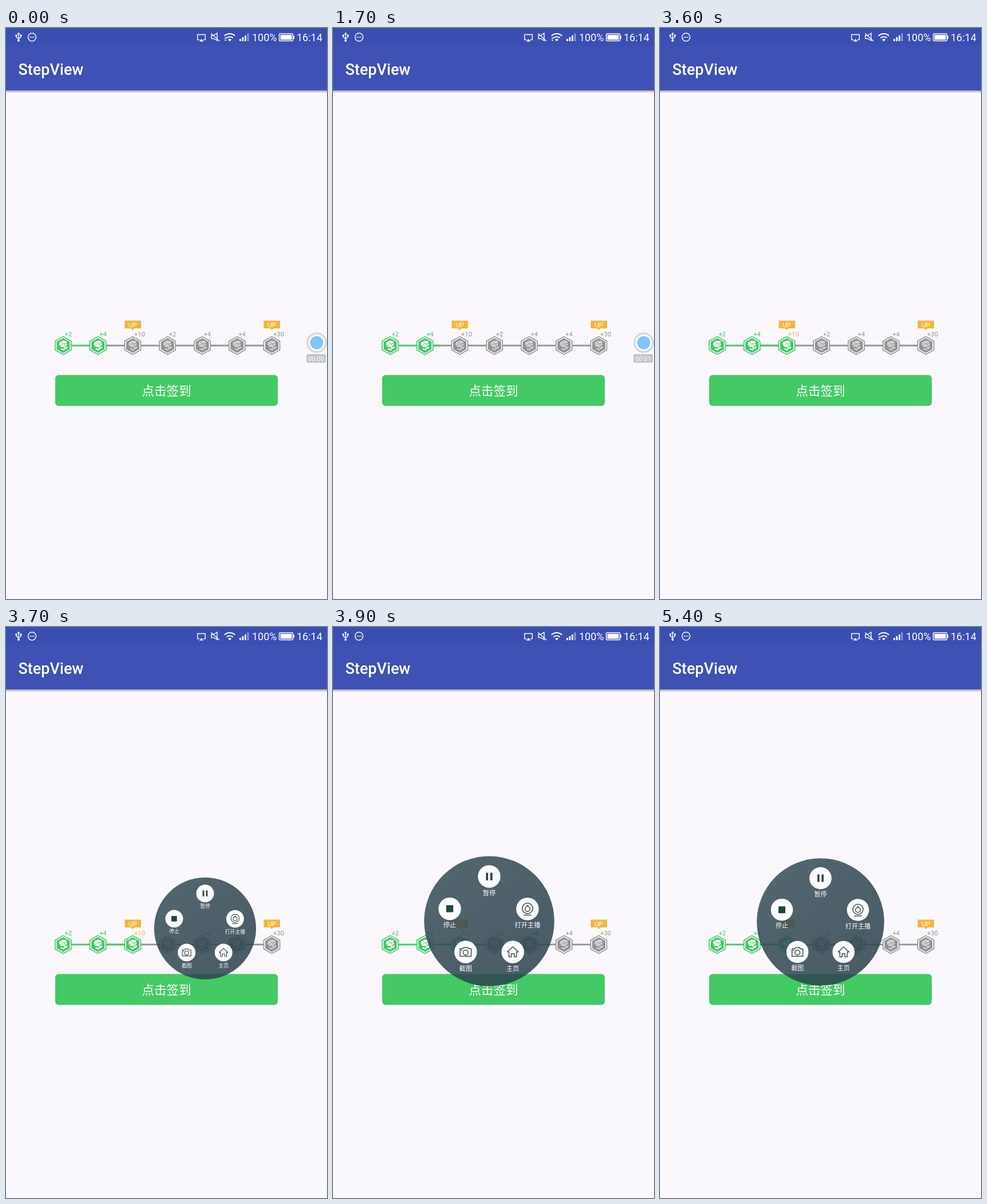
Write an HTML page that moves like this. It is 561 by 998 pixels and loops after 6000 ms.

```html
<!DOCTYPE html>
<html lang="zh-CN">
<head>
<meta charset="utf-8">
<title>StepView</title>
<style>
  html, body { margin: 0; width: 100%; height: 100%; overflow: hidden; background: #faf8fc; }
  svg { display: block; width: 561px; height: 998px; }
  text { font-family: Roboto, "Noto Sans CJK SC", "Noto Sans CJK", sans-serif; fill: #fff; }
  .cjk { font-family: "Noto Sans CJK SC", "Noto Sans CJK", sans-serif; }
  .mid { text-anchor: middle; }
  .line { fill: none; stroke: #fff; stroke-width: 1.4; }
  .dark { fill: none; stroke: #34474f; stroke-width: 1.4; stroke-linejoin: round; stroke-linecap: round; }
  .step { color: #929294; --rose: #d2d2d4; }
  .step.done { color: #42c965; --rose: #fff; }
</style>
</head>
<body>
<svg viewBox="0 0 561 998">
  <defs>
    <linearGradient id="shade" x2="0" y2="1">
      <stop stop-color="#000" stop-opacity=".34"/>
      <stop offset="1" stop-color="#000" stop-opacity="0"/>
    </linearGradient>
    <linearGradient id="glass" x1=".1" y1=".1" x2=".8" y2=".9">
      <stop stop-color="#354b54"/>
      <stop offset="1" stop-color="#2a414d"/>
    </linearGradient>
    <g id="hexagon">
      <path d="M0-15.6L14-7.8V7.8L0 15.6L-14 7.8V-7.8Z" fill="#fff" stroke="currentColor" stroke-width="1.6"/>
      <path d="M0-13L11.5-6.5V6.5L0 13L-11.5 6.5V-6.5Z" fill="currentColor"/>
    </g>
    <g id="rose">
      <path d="M-7-3Q-7-7-3-7Q-1-10 2-8Q7-9 6-4Q8-1 4 1Q2 4-1 2Q-5 4-6 0Q-8-1-7-3Z"/>
      <path d="M1 2Q4 5 0 9M2 5Q5 6 7 3" fill="none" stroke="var(--rose)" stroke-width="1.5"/>
      <path d="M3 5Q4 1 8 2Q7 6 3 5ZM1 6Q-3 4-5 6Q-2 9 1 7Z"/>
      <path d="M-3-6Q-1-2 3-3L6-4M-1-3Q-3 0-6 0M2-3Q1 0 4 1" fill="none" stroke="currentColor" stroke-width=".9"/>
    </g>
  </defs>

  <rect width="561" height="998" fill="#faf8fc"/>
  <rect y="109" width="561" height="5" fill="url(#shade)"/>
  <rect width="561" height="109" fill="#3f51b5"/>
  <rect width="561" height="31" fill="#3b4eb2"/>

  <g id="status">
    <path class="line" d="M22 9V22M18 13V16L22 19L26 16V13"/>
    <path d="M19.500 11L22 7.500L24.500 11ZM16.500 11.500h3v3h-3ZM24.500 11.500h3v3h-3Z" fill="#fff"/>
    <circle cx="22" cy="22" r="2" fill="#fff"/>
    <circle class="line" cx="45.500" cy="16" r="7"/>
    <path d="M41.500 15.300h1.800v1.800h-1.800ZM44.600 15.300h1.800v1.800h-1.800ZM47.700 15.300h1.800v1.800h-1.800Z" fill="#fff"/>
    <path class="line" d="M338 20.500H334.700V11.500H348.300V20.500H345"/>
    <path d="M337.500 23.500L341.500 19L345.500 23.500Z" fill="#fff"/>
    <path class="line" d="M359 13H363L369 9V22L363 18.500H359ZM358.500 9.500L373 23"/>
    <g class="line" stroke-width="2">
      <path d="M381.800 13.800A13 13 0 0 1 400.200 13.800" style="stroke-width:2"/>
      <path d="M385.300 17.500A8.100 8.100 0 0 1 396.700 17.500" style="stroke-width:2"/>
    </g>
    <path d="M388 20.300A4.200 4.200 0 0 1 394 20.300L391 23.500Z" fill="#fff"/>
    <path id="traffic" d="M381.500 18.500h4l-2 -2.500ZM381.500 20.500h4l-2 2.500Z" fill="#fff"/>
    <path d="M408 19h2.800v4H408ZM412.500 16h2.800v7h-2.800ZM417 13h2.800v10H417Z" fill="#fff"/>
    <path d="M421.500 9.500h2.800V23h-2.800Z" fill="#fff" opacity=".45"/>
    <text x="430" y="22.500" font-size="18">100%</text>
    <rect class="line" x="477.500" y="10" width="24" height="12.500" rx="1.500"/>
    <path d="M479.500 12h20v8.500h-20ZM502 13.500h2v5.500h-2Z" fill="#fff"/>
    <text x="508" y="22.500" font-size="18">16:14</text>
  </g>
  <text x="21.500" y="81.500" font-size="27" font-weight="500">StepView</text>

  <g id="steps"></g>

  <rect x="86" y="606.500" width="389" height="54" rx="6" fill="#43ca64"/>
  <text class="cjk mid" x="280.500" y="642" font-size="21.500">点击签到</text>

  <g id="ball">
    <circle cx="543" cy="550" r="18" fill="#d8d8da"/>
    <circle cx="543" cy="550" r="14.500" fill="#fff"/>
    <circle cx="543" cy="550" r="11.500" fill="#7ec6fb"/>
    <rect x="525" y="570" width="34" height="15" rx="3" fill="#c5c4c7"/>
    <text id="clock" class="mid" x="542" y="581.500" font-size="11">00:00</text>
  </g>

  <g id="panel">
    <circle r="111.300" fill="url(#glass)" opacity=".85"/>
  </g>
</svg>
<script>
const LOOP = 6000, TICK = 100;
const SPACING = 60.75, FIRST_X = 100, STEP_Y = 555;
const GREEN = '#42c965', GRAY = '#929294', ORANGE = '#f7b43a';
const $ = id => document.getElementById(id);

const rewards = [2, 4, 10, 2, 4, 4, 30];
const bonusDays = [2, 6];
const stepX = i => FIRST_X + SPACING * i;

const connector = (i, color) =>
  `<rect class="link" x="${stepX(i) + 14.5}" y="${STEP_Y - 1.4}" width="${SPACING - 29}" height="2.8" fill="${color}"/>`;

const badge = `<path d="M-14-43.500H14.500V-30H3L0-27L-3-30H-14Z" fill="${ORANGE}"/>
  <text class="mid" x="0" y="-32.500" font-size="11.500">UP</text>`;

const stepMarkup = (reward, i) => `<g class="step ${i < 2 ? 'done' : ''}" transform="translate(${stepX(i)} ${STEP_Y})">
  <use href="#hexagon"/><use href="#rose" style="fill:var(--rose)"/>
  <text x="2.500" y="-16.500" font-size="11.200" style="fill:${i < 2 ? GREEN : GRAY}">+${reward}</text>
  ${bonusDays.includes(i) ? badge : ''}</g>`;

$('steps').innerHTML =
  rewards.slice(1).map((_, i) => connector(i, i ? GRAY : GREEN)).join('') +
  connector(1, GREEN).replace('class="link"', 'id="progress"') +
  rewards.map(stepMarkup).join('');

const menu = [
  [0, -76.5, '暂停', '<path d="M-5.500-6.500h3.600v13h-3.600ZM1.900-6.500h3.600v13H1.900Z" fill="#2c434c"/>'],
  [-67.5, -21.3, '停止', '<rect x="-6" y="-6" width="12" height="12" rx="1" fill="#24443f"/>'],
  [65.5, -21, '打开主播', '<circle class="dark" cy="-1" r="9"/><circle class="dark" cy="0" r="4.300"/><path class="dark" d="M-1-6H1M-6 10.500H6"/>'],
  [-40.3, 52.5, '截图', '<path class="dark" d="M-9.500-5.500H-5L-3.500-7.500H3.500L5-5.500H9.500V7.500H-9.500Z"/><circle class="dark" cy="1" r="4.300"/><path class="dark" d="M-7.500-3H-6"/>'],
  [40.3, 52.5, '主页', '<path class="dark" d="M-9.500 0L0-9L9.500 0H6.500V8.500H2.500V3H-2.500V8.500H-6.500V0Z"/>'],
];
$('panel').innerHTML += menu.map(([x, y, label, icon]) => `<g transform="translate(${x} ${y})">
  <circle r="19.300" fill="#fff"/>${icon}
  <text class="cjk mid" y="32" font-size="11">${label}</text></g>`).join('');

const third = document.querySelectorAll('.step')[2];
const thirdLabel = third.querySelector('text');
const clamp = v => Math.min(1, Math.max(0, v));
const mix = (a, b, p) => a + (b - a) * p;
const overshoot = t => 1 + (t - 1) ** 2 * (3 * (t - 1) + 2);

function draw(time) {
  const t = Math.floor(time / TICK) * TICK;

  $('progress').setAttribute('width', (SPACING - 29) * clamp((t - 1500) / 500));
  const checkedIn = t >= 2100;
  third.classList.toggle('done', checkedIn);
  thirdLabel.style.fill = checkedIn ? ORANGE : GRAY;

  $('clock').textContent = '00:0' + Math.floor(t / 1000);
  $('ball').style.display = t < 3600 ? '' : 'none';
  $('traffic').style.display = t < 2900 || t >= 5400 ? '' : 'none';

  // The menu springs out of the ball and settles at the centre.
  const p = overshoot(clamp((t - 3640) / 300));
  $('panel').style.display = t > 3600 ? '' : 'none';
  $('panel').setAttribute('transform',
    `translate(${mix(544, 280.5, p)} ${mix(560, 515.5, p)}) scale(${mix(0.22, 1, p)})`);
}

const start = performance.now();
function loop(now) {
  draw(Math.max(0, now - start) % LOOP);
  requestAnimationFrame(loop);
}
draw(0);
requestAnimationFrame(loop);
</script>
</body>
</html>
```
